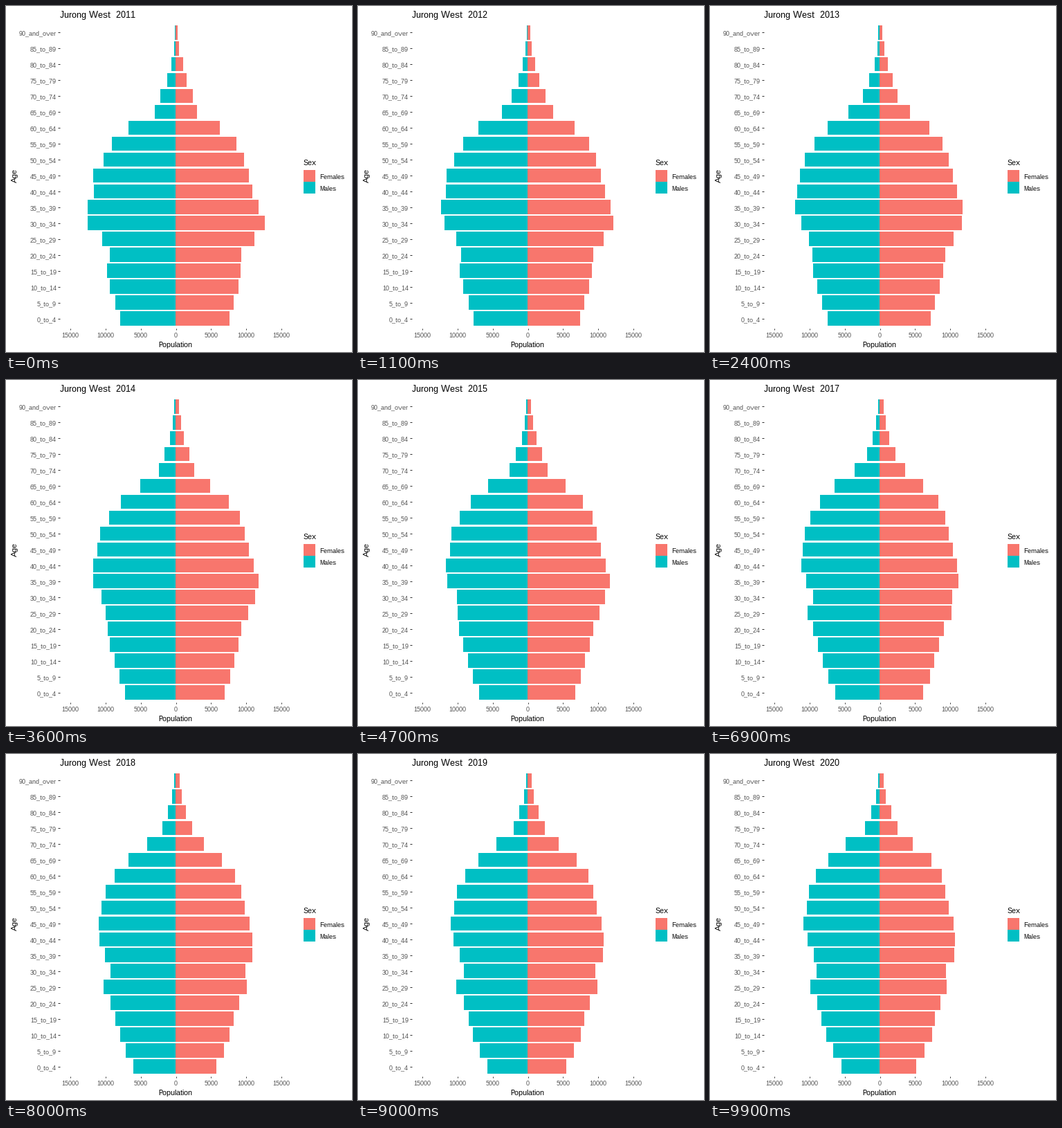
These frames come from a looping animation (500x500 px, 10000 ms). A matplotlib script:

```python
import matplotlib.pyplot as plt
import numpy as np
from matplotlib.animation import FuncAnimation
from matplotlib.patches import Rectangle

FRAMES, STEPS_PER_YEAR, FIRST_YEAR = 100, 11, 2011
SALMON, TEAL, GREY = "#F8766D", "#00BFC4", "#4D4D4D"
ZERO_X, PX_PER_5000 = 245, 50.9
BASE_Y, ROW = 451.522, 22.96
BAR_H = 0.9 * ROW

AGES = [f"{a}_to_{a + 4}" for a in range(0, 90, 5)] + ["90_and_over"]
BANDS = np.arange(len(AGES))
BANDS_AGED = 9 / 5  # nine years pass through five-year bands

# Bar lengths by age band in the first and the last year
MALES = (
    [80, 87, 95, 99, 95, 106, 127, 127, 118, 119, 104, 92, 68, 30, 22, 12, 6, 2, 1],
    [55, 67, 77, 84, 90, 100, 91, 95, 104, 110, 105, 102, 92, 74, 49, 21, 12, 5, 2],
)
FEMALES = (
    [78, 84, 91, 94, 95, 114, 129, 120, 111, 106, 99, 88, 64, 31, 25, 16, 11, 5, 3],
    [53, 65, 76, 80, 88, 97, 96, 108, 109, 107, 100, 95, 90, 75, 48, 26, 17, 9, 6],
)


def sample(profile, band):
    """Read a profile between bands, extending its slope below the youngest."""
    slope = profile[1] - profile[0]
    return np.interp(band, BANDS, profile) + slope * np.minimum(band, 0)


def lengths(profiles, u):
    """Blend both profiles along the cohorts, which move up as they age."""
    first, last = profiles
    aged = sample(first, BANDS - BANDS_AGED * u)
    to_come = sample(last, BANDS + BANDS_AGED * (1 - u))
    arrivals = 56 * u**2 * (1 - u) * np.exp(-4 * (BANDS - 5) ** 2)
    return (1 - u) * aged + u * to_come + arrivals


plt.rcParams.update({
    "font.family": "Liberation Sans",
    "text.hinting": "native",
    "text.hinting_factor": 1,
})
fig = plt.figure(figsize=(5, 5), dpi=100, facecolor="white")
ax = fig.add_axes([0, 0, 1, 1])
ax.set(xlim=(0, 500), ylim=(500, 0))
ax.axis("off")


def label(x, y, text, px, color="black", ha="left", va="baseline", **kw):
    return ax.text(x, y, text, fontsize=px * 0.72, color=color, ha=ha, va=va, **kw)


def box(x, y, w, h, color):
    return ax.add_patch(Rectangle((x, y), w, h, facecolor=color, linewidth=0,
                                  antialiased=False))


def tick(xs, ys):
    ax.plot(xs, ys, color="#333333", linewidth=0.72, solid_capstyle="butt")


def bars(color):
    return [box(ZERO_X, BASE_Y - i * ROW - BAR_H / 2, 0, BAR_H, color)
            for i in BANDS]


male_bars, female_bars = bars(TEAL), bars(SALMON)

for i, age in enumerate(AGES):
    y = BASE_Y - i * ROW
    label(73, y + 4.5, age, 9, GREY, "right")
    tick((75, 78), (y, y))

for n in range(-3, 4):
    x = ZERO_X + 0.5 + n * PX_PER_5000
    label(x, 479, str(abs(n) * 5000), 9, GREY, "center")
    tick((x, x), (465.5, 468))

title = label(77.5, 17, "", 13)
label(244.5, 493, "Population", 11, ha="center")
label(17.5, 245, "Age", 11, ha="right", va="center", rotation=90)

label(430, 230, "Sex", 11)
for y, name, color in ((237, "Females", SALMON), (254, "Males", TEAL)):
    box(430, y, 17, 17, color)
    label(453, y + 13, name, 9)


def update(step):
    u = step / (FRAMES - 1)
    for bar, length in zip(male_bars, lengths(MALES, u)):
        bar.set_x(ZERO_X - length)
        bar.set_width(length)
    for bar, length in zip(female_bars, lengths(FEMALES, u)):
        bar.set_width(length)
    title.set_text(f"Jurong West  {FIRST_YEAR + step // STEPS_PER_YEAR}")
    return [*male_bars, *female_bars, title]


anim = FuncAnimation(fig, update, frames=FRAMES, interval=100,
                     repeat=True, repeat_delay=0, blit=False)
plt.show()
```
